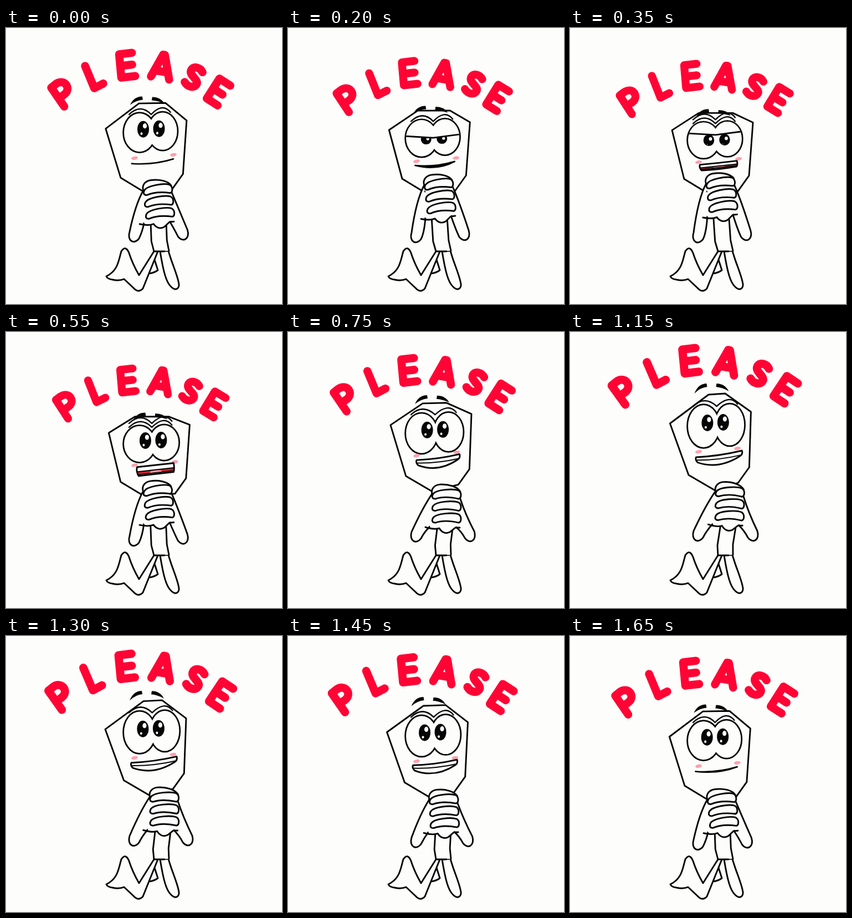
Recreate the animation shown at these times as an HTML page with a canvas. Size 498x498 px, loop 1.7 s.

```html
<!DOCTYPE html>
<html lang="en">
<head>
<meta charset="utf-8">
<title>Please</title>
<style>
  html, body { margin: 0; width: 100%; height: 100%; overflow: hidden; background: #fdfefc; }
  canvas { display: block; width: 498px; height: 498px; }
</style>
</head>
<body>
<canvas width="498" height="498" role="img" aria-label="PLEASE"></canvas>
<script>
const ctx = document.querySelector('canvas').getContext('2d');
const LOOP = 1700, STEP = 50;
const INK = '#050505', PAPER = '#fdfefc', RED = '#ff0434', PINK = '#ff9fae';

const rad = deg => deg * Math.PI / 180;
const wave = (t, peak, period = LOOP) => Math.cos(2 * Math.PI * (t - peak) / period);
const smooth = (a, b, t) => {
  const u = Math.min(1, Math.max(0, (t - a) / (b - a)));
  return u * u * (3 - 2 * u);
};

// Smooth looping curve through a few [time, value] points.
function curve(...keys) {
  const n = keys.length;
  const time = i => keys[(i + n) % n][0] + LOOP * Math.floor(i / n);
  const value = i => keys[(i + n) % n][1];
  const slope = i => (value(i + 1) - value(i - 1)) / (time(i + 1) - time(i - 1));
  return t => {
    let i = n - 1;
    while (time(i) > t) i--;
    const span = time(i + 1) - time(i), u = (t - time(i)) / span;
    const p = value(i), q = value(i + 1), m = slope(i) * span, w = slope(i + 1) * span;
    return p + u * (m + u * (3 * (q - p) - 2 * m - w + u * (2 * (p - q) + m + w)));
  };
}

// 0 is stretched up, 1 is sunk down; the word trails the body.
const wordDrop = curve([0, .43], [200, .83], [550, 1], [750, .49], [1150, 0], [1450, .26], [1650, .43]);
const bodyDrop = curve([0, .88], [200, 1], [550, .9], [750, .15], [1150, 0], [1450, .45], [1650, .88]);

function poseAt(t) {
  const word = wordDrop(t), body = bodyDrop(t), face = .7 * word + .3 * body;
  return {
    word, body, face,
    jaw: (face + body) / 2,
    sway: 3.5 * wave(t, 600),
    lid: smooth(50, 180, t) * (1 - smooth(300, 450, t)),
    open: smooth(100, 500, t) * (1 - smooth(1450, 1680, t)),
    parted: smooth(200, 400, t) * (1 - smooth(550, 750, t)),
    handX: 288 - 14 * body,
    handY: 311 - 5 * wave(t, 375) + 5 * wave(t, 740, LOOP / 2)
  };
}

// Each letter: strokes around its centre, and its distance along the arch.
const LETTERS = [
  ['M-10 22L-11-19L0-20C19-20 19 4 0 4L-10 4', -134],
  ['M-9-20L-8 23L10 21', -80],
  ['M12-21L-11-21L-12 21L13 21M-11 0L10 0', -24],
  ['M-16 21L-1-21L2-21L17 21M-10 9L11 9', 36],
  ['M10-15C3-21-11-20-10-9C-9 0 10 0 9 9C8 18-4 20-12 14', 91],
  ['M12-22L-11-22L-11 20L12 20M-11-1L9-1', 132]
].map(([d, along]) => [new Path2D(d), along]);

function line(d, width = 2.9) {
  ctx.lineWidth = width;
  ctx.strokeStyle = INK;
  ctx.stroke(new Path2D(d));
}
function fill(d, color = PAPER) {
  ctx.fillStyle = color;
  ctx.fill(new Path2D(d));
}
function shape(d) { fill(d); line(d); }
function oval(x, y, rx, ry, color, turn = 0) {
  ctx.fillStyle = color;
  ctx.beginPath();
  ctx.ellipse(x, y, rx, ry, turn, 0, 7);
  ctx.fill();
}

function drawWord({ word }) {
  const spread = 1.1 - .1 * word, size = 1.03 - .05 * word;
  for (const [path, along] of LETTERS) {
    const d = along * spread;
    ctx.save();
    ctx.translate(243 + d, 50 + 36 * word + .0026 * d * d);
    ctx.rotate(Math.atan(.0046 * d));
    ctx.scale(size, size);
    ctx.strokeStyle = RED;
    ctx.lineWidth = 14.5;
    ctx.stroke(path);
    ctx.restore();
  }
}

function drawBody({ handX }) {
  shape('M258 443Q267 442 274 437L268 418');
  shape('M267 403L240 446Q228 425 222 406Q216 391 208 403C203 420 202 438 181 448Q183 453 192 454Q204 457 213 453' +
    'L230 469Q239 479 247 470L274 403');
  shape('M278 403L293 402C299 424 307 440 311 457C315 471 306 475 298 467C289 459 284 440 278 403');
  const waist = 277 + (handX - 278) * .3;
  const left = `M${handX - 15} 340L${waist - 14} 385L267 403`;
  const right = `L294 402L${waist + 14} 383L${handX + 13} 340`;
  fill(left + right);
  line(left + right.replace('L', 'M'));
  line('M268 403L286 403');
}

function drawEyes({ sway, lid }, lx, ly, rx, ry, h) {
  const eyes = new Path2D(), right = new Path2D();
  eyes.ellipse(lx, ly, 28, h - 1, 0, 0, 7);
  right.ellipse(rx, ry, 26, h - 2, 0, 0, 7);
  eyes.addPath(right);
  ctx.lineWidth = 5.5;
  ctx.strokeStyle = INK;
  ctx.stroke(eyes);
  ctx.fillStyle = PAPER;
  ctx.fill(eyes);

  ctx.save();
  ctx.clip(eyes);
  const px = lx + 8 + .7 * sway, py = ly - 6 + 8 * lid;
  for (const side of [0, 1]) {
    const x = px + 28.5 * side, y = py - side;
    oval(x, y, 10.5 - lid, 15 - 6 * lid, INK);
    oval(x + 3, y - 6 + 5 * lid, 3.6 - lid, 4.6 - 2 * lid, '#fff');
    oval(x - 3, y + 8, 2 - 2 * lid, 2.3 - 2 * lid, '#fff');
  }
  if (lid > 0) {
    const up = (1 - lid) * h;
    const edge = `M${lx - 31} ${ly - 4 - up}L${(lx + rx) / 2} ${ly - 1 - up}L${rx + 29} ${ry - 5 - up}`;
    fill(edge + `V${ly - h - 9}H${lx - 31}Z`);
    line(edge);
  }
  ctx.restore();
}

function drawWrinkles(parted, lx, rx, top) {
  const mid = (lx + rx) / 2;
  const fold = y => line(`M${lx - 19} ${y + 3}Q${lx + 2} ${y - 17} ${mid} ${y + 3}` +
    `Q${rx} ${y - 19} ${rx + 14} ${y - 1}`, 2.4);
  fold(top);
  if (parted > .3) fold(top - 7);
}

function drawMouth({ jaw, sway, open, parted }) {
  const sink = 5 * (1 - open), h = 19 * open;
  const ax = 229 + sway + 4 * parted, ay = 226 + 19 * jaw + sink;
  const bx = 311 - 11 * jaw + .5 * sway, by = 214 + 24 * jaw + sink;
  const mx = (ax + bx) / 2, my = (ay + by) / 2;
  if (h < 5) {
    const d = `M${ax} ${ay}Q${mx} ${my + 7} ${bx} ${by}Q${mx + 4} ${my + 7 + 2.2 * h} ${ax} ${ay}Z`;
    fill(d, INK);
    line(d, 2.6);
    return;
  }
  const flat = 1 - parted, lower = h * (.5 + .35 * parted);
  const d = `M${ax} ${ay}Q${mx} ${my + 4 * flat} ${bx} ${by}Q${bx + 2} ${by + lower * .6} ${bx - 3 * flat} ${by + lower}` +
    `Q${mx} ${my + lower + h * flat} ${ax + 3} ${ay + lower}Q${ax - 2} ${ay + lower * .5} ${ax} ${ay}Z`;
  fill(d);
  if (parted > .1) {
    const top = h * .45, gap = h * .28 * parted;
    const band = y => `M${ax + 1} ${ay + y}L${bx} ${by + y}`;
    fill(band(top) + `V${by + top + gap}L${ax + 1} ${ay + top + gap}Z`, '#cf1f2c');
    oval(mx + 1, my + top + gap * .65, 11, gap * .5, PINK, -.1);
    line(band(top) + band(top + gap), 1.9);
  } else {
    line(`M${ax + 1} ${ay + h * .28}Q${mx} ${my + h * .6} ${bx} ${by + h * .4}`, 2);
  }
  line(d);
}

function drawBrows({ face, sway }) {
  const brow = (x, y, dir, rise) => fill(
    `M${x} ${y}Q${x + 7 * dir} ${y - rise - 2} ${x + 22 * dir} ${y - rise - 2}` +
    `L${x + 23 * dir} ${y - rise + 4}Q${x + 11 * dir} ${y - rise + 5} ${x} ${y}Z`, INK);
  const y = 111 + 49 * face, rise = 16 - 5 * face;
  brow(226 + sway, y, 1, rise);
  brow(288 + sway, y - 4 + 3 * face, -1, rise * .75);
}

function drawHead(pose) {
  const { body, face, jaw, sway, parted } = pose;
  const right = 325 - 4 * body + sway, jawY = 244 + 22 * body;
  shape(`M${182 + sway} ${165 + 19 * body}L${250 - 18 * face} ${113 + 41 * face}` +
    `L${280 + 14 * face} ${111 + 43 * face}L${328 + sway} ${144 + 26 * body}` +
    `L${right} ${jawY}L${right - 20} ${jawY + 28}L${262 - 18 * body} ${286 + 9 * body}` +
    `L${214 - 8 * body} ${258 + 14 * body}Z`);
  const lx = 241, ly = 170 + 33 * face, rx = 289 - 6 * body + .5 * sway, ry = ly - 2.5, h = 39 - 6 * face;
  drawWrinkles(parted, lx, rx, ly - h);
  drawEyes(pose, lx, ly, rx, ry, h);
  drawBrows(pose);
  const cheek = 216 + 26 * jaw;
  oval(232, cheek, 6, 3, PINK, -.2);
  oval(303 + .5 * sway, cheek - 6, 6, 3, PINK, -.15);
  drawMouth(pose);
}

const finger = y => `M-24 ${y}C-18 ${y - 8} 12 ${y - 10} 22 ${y - 6}C28 ${y - 2} 27 ${y + 8} 22 ${y + 9}` +
  `C5 ${y + 5}-8 ${y + 5}-20 ${y + 9}C-26 ${y + 9}-27 ${y + 5}-24 ${y}Z`;

function drawArms({ body, handX, handY }) {
  const turn = rad(1 - 7 * body), c = Math.cos(turn), s = Math.sin(turn);
  const hand = (x, y) => `${handX + x * c - y * s} ${handY + x * s + y * c}`;
  const arm = (x, y, dir, shoulder, bend, wrist) => shape(
    `M${shoulder}Q${bend} ${x - 8 * dir} ${y - 8}C${x - 13 * dir} ${y + 8} ${x} ${y + 16} ${x + 9 * dir} ${y + 4}` +
    `Q${x + 15 * dir} ${y - 8} ${wrist}`);
  arm(231, 367 + 10 * body, 1, hand(-26, -23), hand(-43, 2), hand(-30, 36));
  arm(330 - 12 * body, 367 + 6 * body, -1, hand(25, -14), hand(34, 14), hand(16, 36));

  ctx.save();
  ctx.translate(handX, handY);
  ctx.rotate(turn);
  const palm = 'M-38 37Q-22 42-13 39C-9 46-2 50 6 46L16 38L24 38';
  fill('M-30 36Q-22 42-13 39C-9 46-2 50 6 46L16 38L25 20L20-20L-24-20Z');
  line(palm);
  shape('M-26-23C-28-32-22-39-12-40C4-41 20-36 25-27L20-18L-22-18');
  for (let i = 0; i < 3; i++) shape(finger(-23 + 21.5 * i));
  ctx.restore();
}

function draw(now) {
  const pose = poseAt(Math.floor(now % LOOP / STEP) * STEP);
  ctx.fillStyle = PAPER;
  ctx.fillRect(0, 0, 498, 498);
  ctx.lineCap = ctx.lineJoin = 'round';
  drawBody(pose);
  drawHead(pose);
  drawArms(pose);
  drawWord(pose);
}

const start = performance.now();
function tick() {
  draw(performance.now() - start);
  requestAnimationFrame(tick);
}
tick();
</script>
</body>
</html>
```
